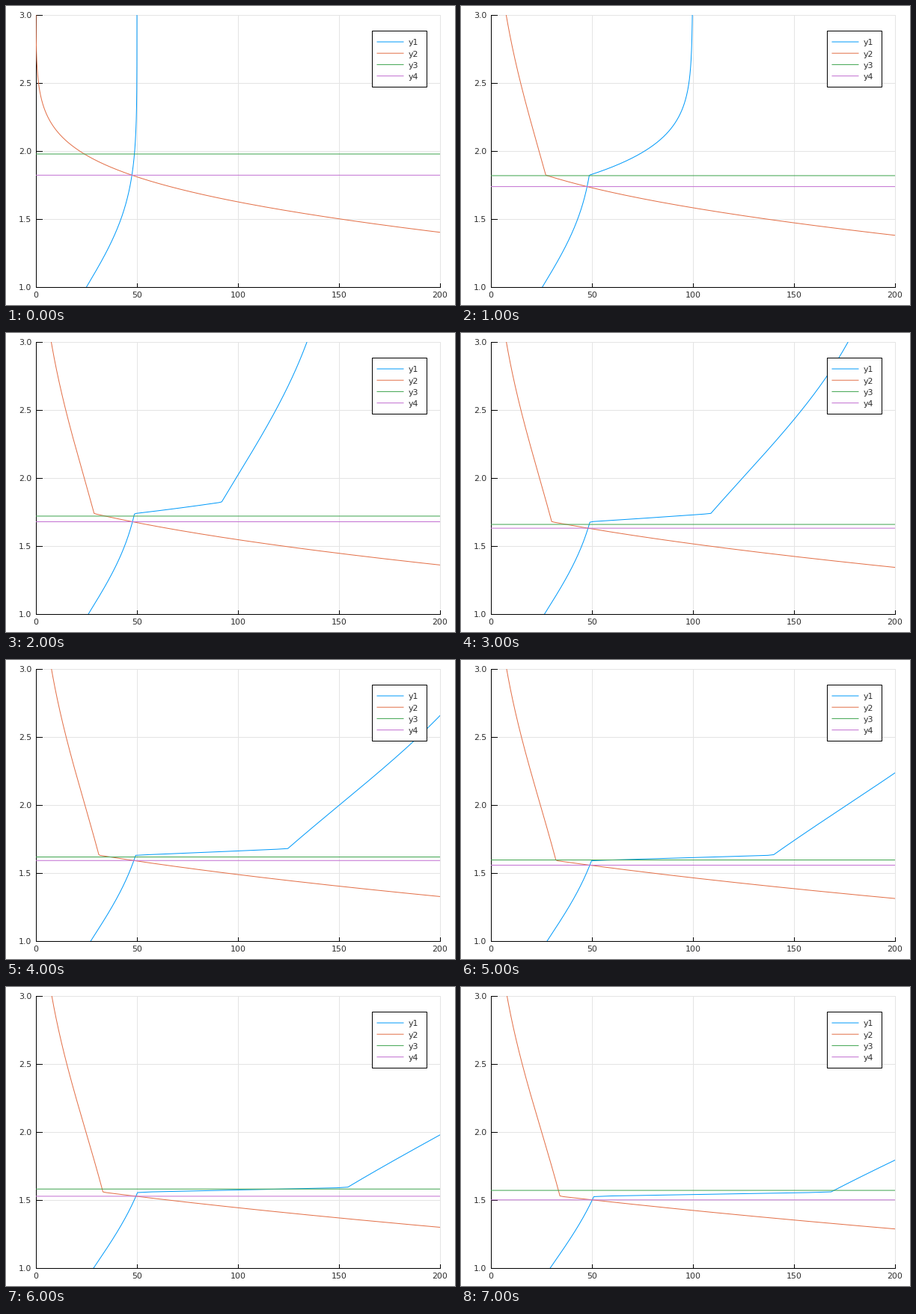
These frames come from a looping animation (600x400 px, 8000 ms). A matplotlib script:

```python
import math

import matplotlib.pyplot as plt
import numpy as np
from matplotlib.animation import FuncAnimation
from matplotlib.patches import Rectangle

W, H, DPI = 600, 400, 100
LEFT, RIGHT, TOP, BOTTOM = 40, 580, 12, 376
PX = 72 / DPI  # one pixel in points
STEPS = 8
COLORS = ["#009afa", "#e36f47", "#3ea44e", "#c371d2"]
# Level of the green line at each step
GREEN = [1.978, 1.819, 1.720, 1.659, 1.618, 1.596, 1.581, 1.571]

price = np.linspace(1, 3, 401)
erf = np.vectorize(math.erf)


def normal_cdf(x, mean, sd):
    return 0.5 * (1 + erf((x - mean) / (sd * math.sqrt(2))))


base = 1000 * normal_cdf(price, 1, 0.5)
joiners = 50 * normal_cdf(price, 2, 1)


def to_x(v):
    return LEFT + np.asarray(v) * (RIGHT - LEFT) / 200


def to_y(v):
    return BOTTOM - (np.asarray(v) - 1) * (BOTTOM - TOP) / 2


def upper_tail(k):
    """Traders without a unit who value it above each price."""
    if k == 0:
        return 1000 - base
    pool = np.minimum(950, base + (k - 1) * joiners)
    return 1000 - pool - joiners


def growth(k):
    return 1 + k * (k + 1) / 1000


def market(k):
    """Supply, demand and clearing price at step k."""
    tail = upper_tail(k)
    demand = 0.95 * growth(k) * tail
    supply = 0.05 * growth(k) * (1000 - tail)
    if k > 0:
        held = 50 * sum(growth(j) for j in range(k))
        supply = supply + held * np.maximum(0, 1 - upper_tail(k - 1) / 50)
    return supply, demand, np.interp(50, tail[::-1], price[::-1])


fig = plt.figure(figsize=(W / DPI, H / DPI), dpi=DPI, facecolor="white")
ax = fig.add_axes([0, 0, 1, 1])
ax.set_xlim(0, W)
ax.set_ylim(H, 0)
ax.axis("off")


def stroke(xs, ys, color="black", z=2, **kw):
    return ax.plot(xs, ys, color=color, lw=PX, zorder=z, **kw)[0]


def label(x, y, text, ha):
    ax.text(x, y + 4, text, ha=ha, va="baseline", fontsize=11 * PX,
            family="DejaVu Sans", color="#2c2c2c", zorder=7)


for v in range(0, 201, 50):
    x = to_x(v)
    stroke([x, x], [TOP, BOTTOM], "#e4e4e4", 1)
    stroke([x, x], [BOTTOM, BOTTOM - 5])
    label(x, 386.5, str(v), "center")

for v in np.arange(1, 3.1, 0.5):
    y = to_y(v)
    stroke([LEFT, RIGHT], [y, y], "#e4e4e4", 1)
    stroke([LEFT, LEFT + 8], [y, y])
    label(34.5, y, f"{v:.1f}", "right")

stroke([LEFT, LEFT], [TOP, BOTTOM])
stroke([LEFT, RIGHT], [BOTTOM, BOTTOM])

area = Rectangle((LEFT, TOP), RIGHT - LEFT, BOTTOM - TOP,
                 transform=ax.transData)
lines = [stroke([], [], c, 3, snap=False) for c in COLORS]
for line in lines:
    line.set_clip_path(area)

ax.add_patch(Rectangle((489, 33), 73, 75, facecolor="white",
                       edgecolor="black", lw=PX, zorder=5))
for i, c in enumerate(COLORS):
    y = 48 + 15.2 * i
    stroke([496, 531], [y, y], c, 6, snap=False)
    label(537.5, y + 0.5, f"y{i + 1}", "left")


def draw(k):
    supply, demand, cleared = market(k)
    lines[0].set_data(to_x(supply), to_y(price))
    lines[1].set_data(to_x(demand), to_y(price))
    for line, level in zip(lines[2:], (GREEN[k], cleared)):
        line.set_data([LEFT, RIGHT], [to_y(level)] * 2)
    return lines


anim = FuncAnimation(fig, draw, frames=STEPS, interval=1000,
                     repeat=True, repeat_delay=0)
plt.show()
```
